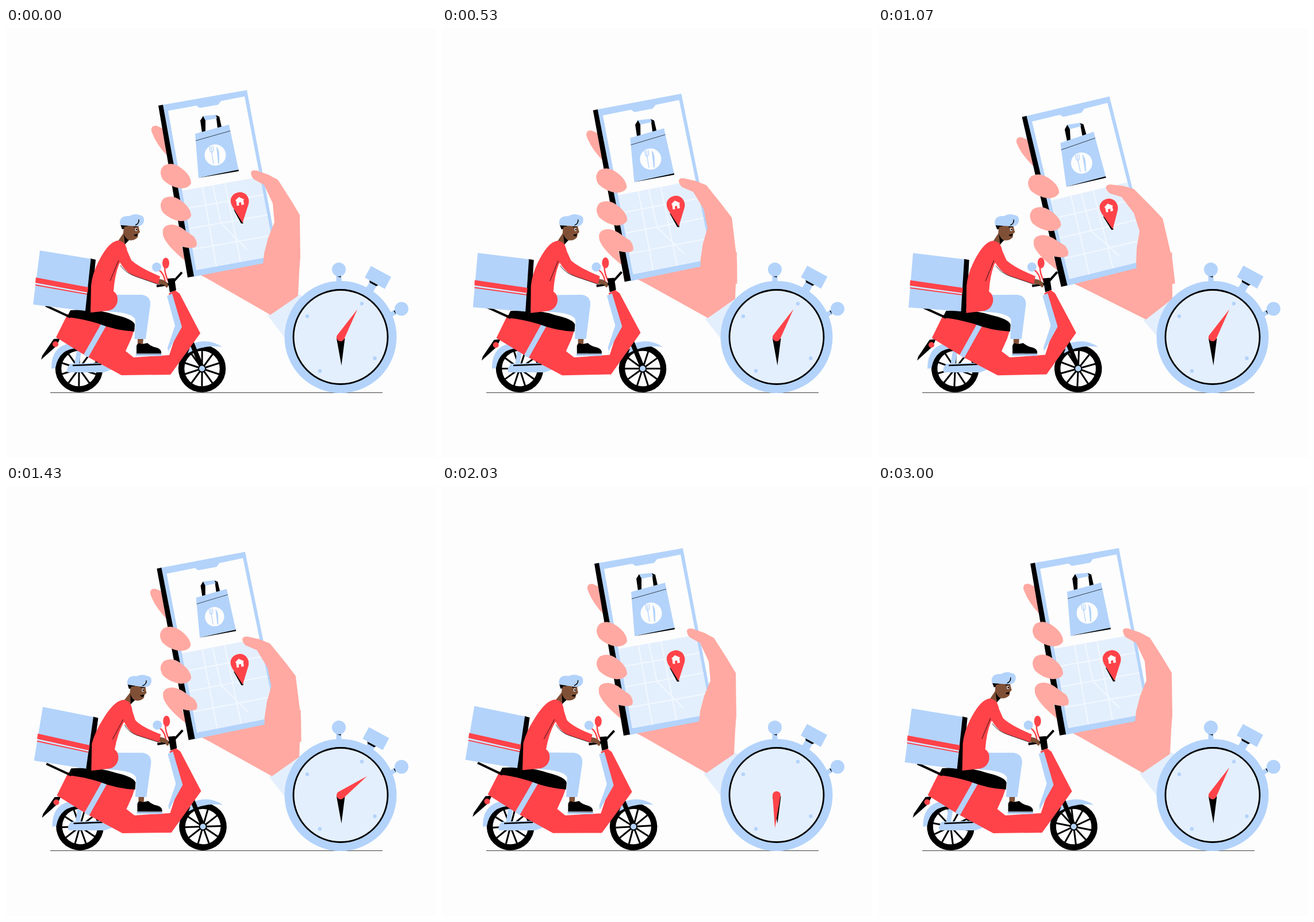
Recreate the animation shown at these times as an HTML page. Size 748x748 px, loop 3030 ms.

```html
<!DOCTYPE html>
<html lang="en">
<head>
<meta charset="utf-8">
<title>Delivery</title>
<style>
html, body { margin: 0; width: 100%; height: 100%; overflow: hidden; background: #fdfdfd; }
svg { display: block; width: 100vw; height: 100vh; }
.b { fill: #b3d3fb; } .p { fill: #e4effd; } .w { fill: #fdfdfd; }
.r { fill: #ff4349; } .k { fill: #000; } .s { fill: #ffa9a2; } .n { fill: #805036; }
.l { fill: none; stroke: #000; }
.rl { fill: none; stroke: #ff4349; }
.bl { fill: none; stroke: #b3d3fb; }
</style>
</head>
<body>
<svg viewBox="0 0 748 748">
  <path class="l" d="M77 634.3H655" stroke-width=".8"/>

  <g id="phone">
    <path class="p" d="M455 500L511 463L548 500L485 539Z"/>
    <path class="s" d="M253 179Q252 169 262 170L273 175L282 224Q260 201 253 179Z"/>
    <path class="s" d="M335 428L447 405L512 385L508 466L460 499L352 437Z"/>
    <path class="s" d="M273 350L300 360L313 406Q278 378 273 360Z"/>
    <path class="b" d="M271 134L419 108L475 404L325 433Z"/>
    <path class="k" d="M265 135L273 133.5L327 432L316 434Z"/>
    <path class="w" d="M282 144L331 135L337 139L369 133.500L374 127L415 119L468 396L331 421Z"/>
    <path class="p" d="M307 283L442 259L468 396L331 421Z"/>
    <path d="M313 314L448 290M319 349L455 325M325 385L461 361M342 277L366 415M381 270L408 407M360 274L374 340L420 386" fill="none" stroke="#f2f8ff" stroke-width="2"/>
    <g id="bag">
      <path class="k" d="M338 161L343 153L347 160L347 180L341 182ZM364 151L371 154L375 172L368 174L366 158Z"/>
      <path class="b" d="M343 153L365 151L367 157L347 161Z"/>
      <path class="k" d="M334 261L404 245L405 249Z"/>
      <path class="b" d="M329 184L388 168L404.500 246.500L335 260.500Z"/>
      <path class="l" d="M330 196L390 179" stroke-width=".7"/>
      <circle class="w" cx="364" cy="221" r="18.500"/>
      <path class="bl" d="M354 206L355 214Q358 219 361 213L360 205M357 206L358 217L361 236" stroke-width="1.300"/>
      <path class="b" d="M366 206Q371 211 371 222L371 236L369 236Z"/>
    </g>
    <path class="k" d="M396 316L409 340L412.500 340L410 318Z"/>
    <path class="r" d="M411.500 339L394 311Q386 296 398 288Q409 282 418 290Q424 297 422 306Z"/>
    <path class="w" d="M399 300L405 294L414 298L413 300L414 307L409.500 308L409 303L405 304L405.500 309L401.500 309L400.500 301Z"/>
    <path id="finger" class="s" d="M275 239Q289 232 304 243Q322 256 322 270Q318 279 303 279Q285 276 273 264Q264 249 275 239Z"/>
    <use href="#finger" y="57"/>
    <path class="s" d="M277 345Q289 338 306 348L327 363Q334 373 331 380Q324 385 309 381Q285 375 274 362Q270 351 277 345Z"/>
    <path id="thumb" class="s" d="M426 251Q428 246 436 248L456 255L473 264L496 300L511 325L512 400L508 440L470 440L447 412L449 392L456 365L467 338L464 305L449 273L431 263Q426 258 426 251Z"/>
  </g>

  <g id="watch">
    <path class="bl" d="M579 425V450" stroke-width="9"/>
    <path class="k" d="M575 431.500H583L582 434Z"/>
    <circle class="b" cx="579" cy="420" r="12"/>
    <path class="bl" d="M664 502L684 490" stroke-width="8"/>
    <path class="k" d="M674 491.500L678 498L677 492Z"/>
    <circle class="b" cx="688" cy="488.500" r="12"/>
    <path class="bl" d="M645 434L626 467" stroke-width="14"/>
    <g id="crown">
      <path class="k" d="M632 439L648 447L644 449L633 443Z"/>
      <path class="b" d="M635 414L670 433L659 454L624 434Z"/>
    </g>
    <circle class="b" cx="582" cy="537.500" r="97.500"/>
    <circle class="p" cx="582" cy="537.500" r="82" stroke="#000" stroke-width="2.800"/>
    <g class="b">
      <circle cx="619" cy="479.500" r="3.200"/><circle cx="524" cy="501.500" r="3.200"/>
      <circle cx="641.500" cy="574.500" r="3.200"/><circle cx="546" cy="596.500" r="3.200"/>
    </g>
    <path class="k" d="M575 540L589.500 540L583.500 587Z"/>
    <path id="hand" class="r" d="M575 538A7 7 0 0 0 589 538L582 481Z"/>
  </g>

  <g id="scooter">
    <g id="wheels"></g>
    <path class="b" d="M79 593Q78 548 124 547L152 560Q94 546 86 591Z"/>
    <path class="b" d="M322 550Q352 538 376 555Q345 550 316 566Z"/>
    <path class="bl" d="M127 562L123 586" stroke-width="8"/>
    <path class="b" d="M112 584L182 582L184 594L170 599L107 599Q104 592 112 584Z"/>
    <path class="l" d="M116 587L166 585" stroke-width="2.500"/>
    <path class="l" d="M321 543L341 591" stroke-width="8"/>
    <circle class="b" cx="341" cy="592.500" r="5"/>

    <g id="body">
      <path class="k" d="M83 541L94 540L88 553L61 577L63 570Z"/>
      <circle class="r" cx="86" cy="550" r="5"/>
      <path class="r" d="M107 498L87 538L140 571L201 604L286 603L338 531L302 462L294 456L283 462L300 520L284 569L222 573L208 562L218 540L224 522L150 500Z"/>
      <path class="b" d="M280 466L289 462L306 520L282 563L281 556L294 518Z"/>
      <path class="b" d="M167 512L176 515L143 573L135 568Z"/>
      <path class="k" d="M112 491Q160 488 190 499Q224 507 224 517L223 528Q190 526 160 514Q130 505 106 503Z"/>
      <path class="l" d="M69 483L112 503" stroke-width="4"/>

      <g id="box">
        <path class="k" d="M147 401L156 403L147 494L136 491Z"/>
        <path class="b" d="M59 387L147.500 401.500L138 492L47 481Z"/>
        <path class="r" d="M52 434L143 451L142 460L51 443Z"/>
        <path class="rl" d="M51 447L141 463" stroke-width="2"/>
        <path d="M51 444.500L141 461" fill="none" stroke="#e4effd" stroke-width="1.500"/>
      </g>

      <path class="n" d="M229 538H239L238 552H229Z"/>
      <path class="b" d="M190 464L236 464Q252 466 251 482L243 541L223.500 541L225 508Q222 495 176 493Z"/>
      <path class="k" d="M227 553Q229 546 236 550L246 548Q252 554 262 556Q271 559 270 566L227 566Z"/>
      <path class="bl" d="M226 568.500H270.500" stroke-width="4"/>
      <path class="l" d="M227 567H270" stroke-width=".6"/>

      <path class="rl" d="M276 416Q276 428 283 442M266 421Q275 427 277 442" stroke-width="2.500"/>
      <ellipse class="r" cx="278" cy="409" rx="6" ry="9.500"/>
      <circle class="b" cx="262" cy="416" r="8"/>
      <path class="l" d="M262 449L288 445M286 447L306 425" stroke-width="4"/>
      <path class="k" d="M281 436L293 435L296 456L285 460Z"/>

      <g id="head">
        <path class="n" d="M205 343L230 339L231 348L233 355L230 358L229 364Q223 371 213 369L207 377L194 372L204 357Z"/>
        <path class="k" d="M205 358Q208 367 214 369L207 376Z"/>
        <path class="k" d="M199 342L213 342L208 349L202 350Z"/>
        <circle class="n" cx="209" cy="349" r="4"/>
        <ellipse class="w" cx="226.500" cy="350.500" rx="2" ry="2.800"/>
        <circle class="k" cx="227" cy="350.500" r="1.400"/>
        <path class="l" d="M222 346L229 345" stroke-width="1.500"/>
        <path class="k" d="M222 360L229 358L228 362Q224 363 222 360Z"/>
        <path class="b" d="M198 339Q198 326 214 327Q224 322 231 325Q241 326 240 335Q239 345 227 345L199 343Z"/>
        <path class="l" d="M231 333Q232 340 225 343" stroke-width="1.500"/>
      </g>
      <path id="torso" class="r"/>
      <path class="n" d="M264 436L273 438L281 443L282 450L279 452L275 447L263 445Z"/>
      <path id="arm" class="r"/>
      <path id="crease" class="l" stroke-width=".8"/>
    </g>
  </g>
</svg>
<script>
const LOOP = 3030;
const $ = id => document.getElementById(id);
const set = (id, value, name = 'transform') => $(id).setAttribute(name, value);
const clamp = x => Math.min(1, Math.max(0, x));

// Smooth curve through [time, value] keys, flat at both ends.
function curve(keys, t) {
  const last = keys.length - 1;
  if (t <= keys[0][0]) return keys[0][1];
  if (t >= keys[last][0]) return keys[last][1];
  const slope = i => i <= 0 || i >= last ? 0 :
    (keys[i + 1][1] - keys[i - 1][1]) / (keys[i + 1][0] - keys[i - 1][0]);
  const i = keys.findIndex(k => k[0] > t) - 1;
  const [t0, a] = keys[i], [t1, b] = keys[i + 1];
  const d = t1 - t0, u = (t - t0) / d, v = 1 - u;
  return a * v * v * (1 + 2 * u) + b * u * u * (3 - 2 * u) +
    d * u * v * (slope(i) * v - slope(i + 1) * u);
}

const TAP = 910;
const tilt = [[0, 0], [160, -3.3], [250, -3.6], [525, -.8], [720, 0]];
const press = [[0, 0], [160, 9], [250, 10], [525, 5.5], [720, 0]];
const sink = [[0, 0], [160, 0], [250, 1], [525, 3.8], [720, 0]];
const drift = [[0, 0], [1700, 0], [2030, .3], [2470, -2], [3030, 0]];
const bagSize = [[1180, 1], [1420, .905], [1680, 1]];
const crownPush = [[120, 0], [200, 6], [300, 6], [400, 0], [1260, 0], [1340, 6], [1460, 6], [1560, 0]];
const boxTilt = [[0, 0], [530, -1.7], [1070, -2], [1430, 2.1], [1730, 2.2], [2030, 1.8], [2470, 1], [3030, 0]];
const leaning = [[0, 0], [530, 0], [1070, 0], [1430, 4.5], [1730, 5], [2030, 4.2], [2470, .8], [3030, 0]];

const HIP = [172, 488];
// Point turned about the hip by a share of the lean.
function bend(x, y, angle, share = 1) {
  const a = angle * share * Math.PI / 180, dx = x - HIP[0], dy = y - HIP[1];
  const c = Math.cos(a), s = Math.sin(a);
  return (HIP[0] + dx * c - dy * s).toFixed(2) + ' ' + (HIP[1] + dx * s + dy * c).toFixed(2);
}

for (const x of [127, 341]) {
  let spokes = '';
  for (let i = 0; i < 10; i++) {
    const a = i * Math.PI / 5;
    spokes += `M0 0L${31 * Math.sin(a)} ${-31 * Math.cos(a)}`;
  }
  $('wheels').innerHTML += `<g transform="translate(${x} 592.500)"><g class="wheel">
    <circle class="w" r="36" stroke="#000" stroke-width="10.500"/>
    <path class="l" d="${spokes}" stroke-width="3"/><circle class="k" r="7"/></g></g>`;
}
const wheels = document.querySelectorAll('.wheel');

function drawRider(a) {
  const p = (x, y, share) => bend(x, y, a, share);
  set('head', `rotate(${a} ${HIP})`);
  set('torso', `M${p(190, 371)}Q${p(199, 367)} ${p(207, 377)}L${p(212, 395)}L${p(197, 410)}` +
    `Q${p(189, 430, .8)} ${p(187, 458, .3)}Q195 463 194 475Q191 490 176 492L147 495` +
    `L148 448Q${p(150, 428, .8)} ${p(160, 408)}Q${p(176, 376)} ${p(190, 371)}Z`, 'd');
  set('arm', `M${p(202, 372)}Q${p(208, 374)} ${p(211, 388)}L${p(218, 404, .9)}` +
    `Q${p(232, 417, .5)} 268 432L265 446L${p(225, 432, .4)}` +
    `Q${p(206, 425, .7)} ${p(196, 403)}Q${p(189, 380)} ${p(202, 372)}Z`, 'd');
  set('crease', `M${p(196, 404)}L${p(181, 440, .8)}M${p(199, 413)}Q${p(208, 426, .7)} ` +
    `${p(225, 432, .4)}L265 446`, 'd');
}

function draw(t) {
  const tap = t < TAP ? t : t - TAP;
  const dy = curve(sink, tap);
  set('phone', `translate(${dy * .3} ${dy + curve(drift, t)}) rotate(${curve(tilt, tap)} 600 397)`);
  set('thumb', `rotate(${-curve(press, tap)} 508 400)`);
  set('bag', `translate(366 212) scale(${curve(bagSize, t)}) translate(-366 -212)`);

  const push = curve(crownPush, t);
  set('crown', `translate(${-push * .55} ${push * .85})`);
  set('hand', `rotate(${31 + 360 * clamp((t - 1323) / 1678)} 582 538)`);

  const sway = Math.sin(2 * Math.PI * t / LOOP);
  set('scooter', `translate(${9 * sway} 0)`);
  set('body', `rotate(${-.6 * sway} 233 590)`);
  set('box', `rotate(${curve(boxTilt, t)} 147 490)`);
  wheels.forEach(w => w.setAttribute('transform', `rotate(${720 * t / LOOP})`));
  drawRider(curve(leaning, t));
}

const start = performance.now();
function tick() {
  draw((performance.now() - start) % LOOP);
  requestAnimationFrame(tick);
}
tick();
</script>
</body>
</html>
```
